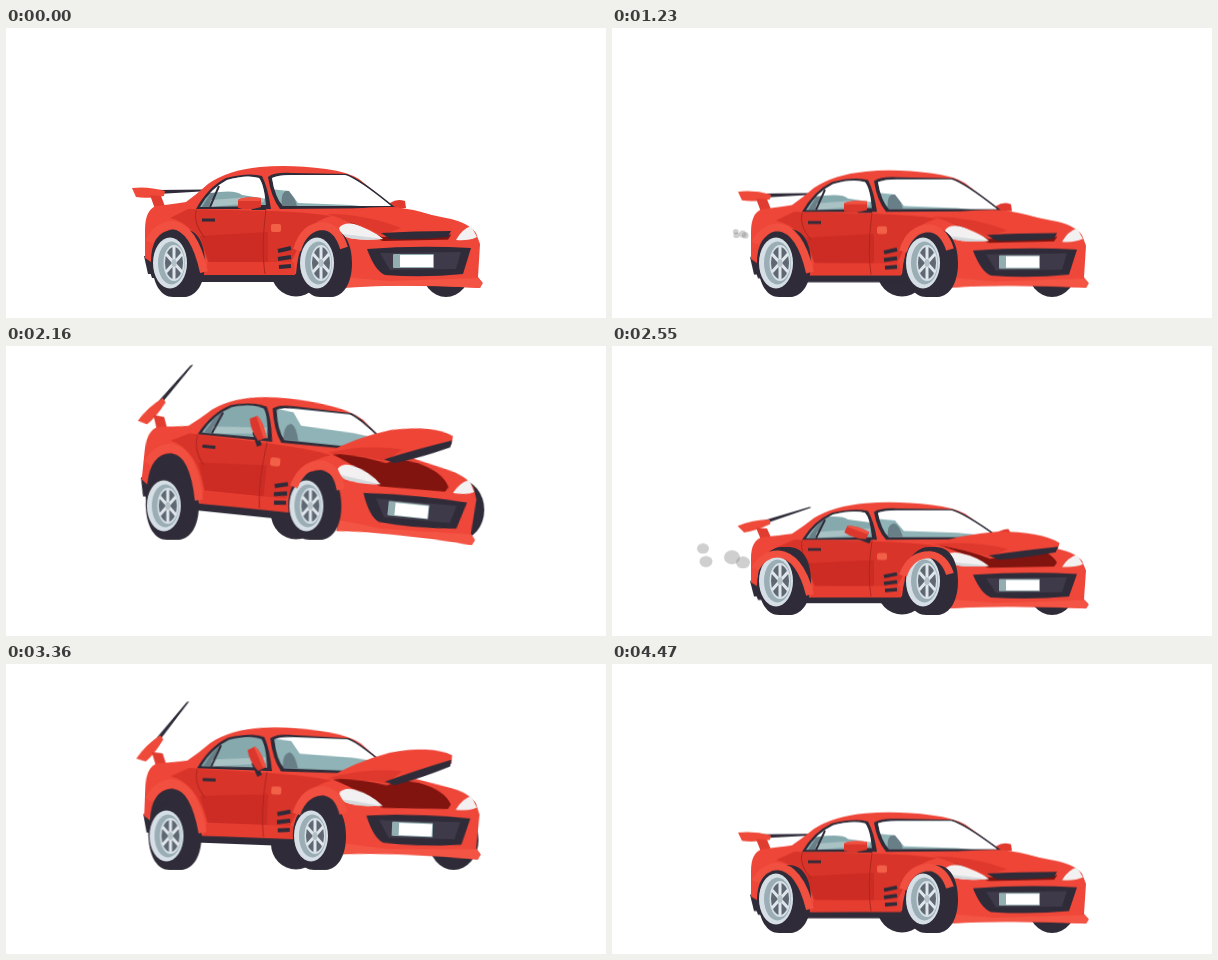
Write an HTML page without scripts that moves like this. It is 600 px wide and 290 px high and loops after 4500 ms.

```html
<!DOCTYPE html>
<html lang="en">
<head>
<meta charset="utf-8">
<title>Bouncing car</title>
<style>
  @property --open { syntax: "<number>"; inherits: true; initial-value: 0; }
  html, body { margin: 0; width: 100%; height: 100%; overflow: hidden; background: #fff; }
  svg { display: block; width: 100%; height: 100%; }

  .hop { animation: hop 1.5s infinite; }
  .spread { animation: spread 1.5s linear infinite; }
  .body { transform-origin: 300px 258px; animation: ride 1.5s linear infinite, flap 1.5s linear infinite; }

  .spoiler { transform-origin: 142px 164px; transform: rotate(calc(var(--open) * -51deg)); }
  .hood { transform-origin: 322px 187px; transform: rotate(calc(var(--open) * -18.5deg)); }
  .mirror { transform-origin: 251px 177px; transform: rotate(calc(var(--open) * 63deg)); }
  .far-mirror { transform-origin: 386px 178px; transform: rotate(calc(var(--open) * -60deg)); }
  .side-glare { transform: translateY(calc(var(--open) * -26px)); }
  .front-glare { transform: translateY(calc(var(--open) * -12px)); }

  .puffs circle { fill: #8c8c8c; opacity: 0; animation: puff 1.125s linear infinite; }

  @keyframes hop {
    0% { transform: translateY(0); animation-timing-function: linear; }
    11.9% { transform: translateY(0); animation-timing-function: cubic-bezier(.333, .667, .667, 1); }
    36.2% { transform: translateY(-84px); animation-timing-function: cubic-bezier(.333, 0, .667, .333); }
    60.5%, 100% { transform: translateY(0); animation-timing-function: linear; }
  }
  @keyframes spread {
    0%, 16% { transform: none; }
    24% { transform: translateX(calc(var(--dx) * .5)); }
    50% { transform: translateX(var(--dx)); }
    56% { transform: translateX(calc(var(--dx) * .55)); }
    62%, 100% { transform: none; }
  }
  @keyframes ride {
    0% { transform: translate(0, 0) rotate(0deg) scaleY(1); }
    4% { transform: translate(0, 0) rotate(0deg) scaleY(1.02); }
    8% { transform: translate(0, -3px) rotate(-1deg) scaleY(.98); }
    12% { transform: translate(0, -12px) rotate(-3deg) scaleY(.96); }
    16% { transform: translate(1px, -32px) rotate(-4deg) scaleY(.97); }
    20% { transform: translate(0, -54px) rotate(-1deg) scaleY(1); }
    24% { transform: translate(-2px, -71px) rotate(2.2deg) scaleY(1.02); }
    30% { transform: translate(-4px, -85px) rotate(3.6deg) scaleY(1.03); }
    36% { transform: translate(-5px, -91px) rotate(4.8deg) scaleY(1.03); }
    43% { transform: translate(-7px, -82px) rotate(5.8deg) scaleY(1.04); }
    50% { transform: translate(-8px, -62px) rotate(6.5deg) scaleY(1.04); }
    56% { transform: translate(-6px, -33px) rotate(5.8deg) scaleY(1.03); }
    60.5% { transform: translate(-3px, -4px) rotate(3.5deg) scaleY(.98); }
    65.5% { transform: translate(0, 8px) rotate(1deg) scaleY(.82); }
    70% { transform: translate(0, 3px) rotate(0deg) scaleY(.87); }
    75.5% { transform: translate(0, 0) rotate(0deg) scaleY(1.04); }
    81% { transform: translate(0, 0) rotate(0deg) scaleY(.95); }
    86% { transform: translate(0, 0) rotate(0deg) scaleY(1.01); }
    90% { transform: translate(0, 0) rotate(0deg) scaleY(1); }
    95% { transform: translate(0, 0) rotate(0deg) scaleY(.92); }
    98% { transform: translate(0, 0) rotate(0deg) scaleY(.91); }
    100% { transform: translate(0, 0) rotate(0deg) scaleY(1); }
  }
  @keyframes flap {
    0%, 60.5% { --open: 0; }
    8% { --open: .03; }
    16% { --open: .45; }
    24% { --open: 1; }
    37% { --open: 1.06; }
    50% { --open: 1; }
    56% { --open: .25; }
    66% { --open: .45; }
    70% { --open: .36; }
    77%, 100% { --open: 0; }
  }
  @keyframes puff {
    0%, 4% { transform: translate(0, 0) scale(.3); opacity: 0; }
    6% { opacity: .42; }
    26.7% { transform: translate(var(--x), var(--y)) scale(1); opacity: .42; }
    41.3% { transform: translate(calc(var(--x) - 8px), calc(var(--y) * .6)) scale(1); opacity: .42; }
    52% { transform: translate(calc(var(--x) - 15px), calc(var(--y) * .6)) scale(.4); opacity: .25; }
    53%, 100% { transform: translate(calc(var(--x) - 15px), 0) scale(0); opacity: 0; }
  }
</style>
</head>
<body>
<svg viewBox="0 0 600 290">
  <defs>
    <g id="wheel">
      <path fill="#2f2b38" d="M5-34C-10-33-19-16-18 2C-17 21-9 34 3 34H15C27 33 35 20 35 0C35-20 27-34 13-34Z"/>
      <ellipse rx="17" ry="25.5" fill="#d5dfe5"/>
      <ellipse cx="1.5" rx="13.5" ry="21.5" fill="#9badb5"/>
      <ellipse cx="4" rx="10.5" ry="18" fill="#d5dfe5"/>
      <ellipse cx="4" rx="9" ry="16" fill="#5f6772"/>
      <path d="M4-16V16M-4-9L12 9M-4 9L12-9" stroke="#dfe7ec" stroke-width="3"/>
      <ellipse cx="4" rx="2.5" ry="4" fill="#b5c1c8"/>
    </g>
    <path id="side-window" d="M194 179Q204 161 221 152Q241 146 253 150Q258 156 260 178Z"/>
    <path id="windscreen" d="M266 150Q272 147 285 147L339 147Q352 151 385 178L277 178Q269 170 266 150Z"/>
    <clipPath id="glass">
      <use href="#side-window"/>
      <use href="#windscreen"/>
    </clipPath>
  </defs>

  <!-- Far wheels -->
  <g class="hop" fill="#2f2b38">
    <ellipse cx="290" cy="243" rx="25" ry="25.5"/>
    <ellipse class="spread" style="--dx: 15px" cx="440" cy="239" rx="25" ry="30"/>
  </g>

  <g class="body">
    <g class="puffs" transform="translate(134 205)">
      <circle r="6" style="--x: -43px; --y: -14px"/>
      <circle r="6.5" style="--x: -40px; --y: 1px"/>
      <circle r="8" style="--x: -14px; --y: -4px"/>
      <circle r="7" style="--x: -3px; --y: 2px"/>
    </g>
    <g fill="#2f2b38">
      <path d="M140 232Q140 202 166 200Q194 202 196 246L190 250H146Z"/>
      <path d="M288 244Q289 204 318 200Q342 206 343 250H290Z"/>
      <path d="M190 244H296V254H190Z"/>
      <path d="M138 228H152V246H142Z"/>
    </g>
    <g class="spoiler">
      <path fill="#2f2b38" d="M150 162L201 161.5L203 163L152 166Z"/>
      <path fill="#ef4a39" d="M126 160Q142 158 159 163L158 168Q140 171 130 169Z"/>
    </g>
    <path fill="#e03c30" d="M144 167L155 168L160 181L149 181Z"/>
    <g class="far-mirror">
      <path fill="#e03a2e" d="M384 175Q391 170 399 173L400 180L386 181Z"/>
    </g>

    <!-- Shell with open wheel arches -->
    <path fill="#ee4638" d="M139 230V202Q139 182 150 178Q168 176 180 174Q191 166 202 156Q222 142 254 139
      Q284 136 320 141Q342 144 353 151L388 179L440 190Q462 194 470 205L474 216L472 249L476 254
      L474 260Q400 256 338 259V236Q337 206 317 203Q293 204 290 246L197 247
      Q193 205 166 202Q145 204 145 234Z"/>
    <path fill="#d9342a" d="M182 181L264 183Q300 184 325 188Q296 196 290 224L284 236L202 234Q191 196 164 190Z"/>
    <path fill="#cc2c24" d="M194 208L262 204V235L203 234Z"/>
    <path fill="#e63d31" d="M202 234H288L289 247H199Z"/>
    <path fill="none" stroke="#ae2620" d="M260 182Q255 220 259 246M190 182Q187 196 199 210"/>
    <path fill="none" stroke="#2f2b38" stroke-width="3" d="M196 192H209"/>
    <rect x="265" y="196" width="10" height="8" rx="2" fill="#f26048"/>
    <path stroke="#2f2b38" stroke-width="4" d="M272 223L285 220M272 231L285 229M273 239L285 238"/>

    <!-- Glass -->
    <path fill="#2f2b38" d="M190 181Q202 159 220 150Q243 144 256 148Q262 160 265 181ZM262 149Q268 144 286 145L341 146Q355 151 390 180L274 181Q265 169 262 149Z"/>
    <use href="#side-window" fill="#86a9ae"/>
    <use href="#windscreen" fill="#8fb3b6"/>
    <g clip-path="url(#glass)">
      <path fill="#697f88" d="M276 178Q274 164 282 162Q287 163 291 178ZM196 179L211 155H215L203 179Z"/>
      <path fill="#a9c2c4" d="M205 172L258 168V174L203 179Z"/>
      <path class="side-glare" fill="#fff" d="M204 165Q230 161 236 167L262 171V120H204Z"/>
      <path class="front-glare" fill="#fff" d="M264 161L283 163L292 175L345 177L400 183V120H264Z"/>
    </g>
    <path stroke="#2f2b38" stroke-width="2" d="M204 179L213 158"/>
    <g class="mirror">
      <path fill="#2f2b38" d="M243 177H260V182H246Z"/>
      <path fill="#dc372c" d="M232 172Q238 168 255 170V179Q243 183 232 180Z"/>
      <path fill="#f05242" d="M232 172Q238 168 255 170L254 173H232Z"/>
    </g>

    <!-- Engine bay and front -->
    <path fill="#82140f" d="M326 187Q365 181 412 187Q438 193 445 207L440 215H378Q360 199 326 187Z"/>
    <path fill="#ef4739" d="M334 207L378 213L470 211L473 223L470 251L341 252Z"/>
    <path fill="#f35443" d="M338 249L383 253L472 250L477 255L474 260Q400 255 338 260Z"/>
    <path fill="#f2f0f0" d="M333 200Q337 194 348 196Q365 200 377 211Q352 213 340 209Q334 206 333 200Z"/>
    <path fill="#d4d9dc" d="M336 206Q354 208 377 211Q352 213 340 209Z"/>
    <path fill="#f2f0f0" d="M450 212Q456 201 465 198L471 209Q463 213 450 212Z"/>
    <path fill="#2f2b38" d="M361 221Q412 217 465 220L457 246Q418 250 379 247Q369 243 361 221Z"/>
    <path fill="#3f3a49" d="M374 225L455 224L450 241L384 242Z"/>
    <rect x="387" y="226" width="41" height="14" rx="1" fill="#93aeb0"/>
    <rect x="394" y="227" width="33" height="12" fill="#fff"/>

    <g class="hood">
      <path fill="#ee4537" d="M321 186Q350 178 388 179Q430 184 447 199L444 207L376 209Q352 195 321 186Z"/>
      <path fill="#df392e" d="M321 186Q360 186 395 200L376 207Q352 195 321 186Z"/>
      <path fill="#2f2b38" d="M375 205Q408 203 445 203L442 209Q410 212 384 211Z"/>
    </g>
  </g>

  <!-- Near wheels -->
  <g class="hop">
    <g class="spread" style="--dx: -7px"><use href="#wheel" x="164" y="235"/></g>
    <g class="spread" style="--dx: -12px"><use href="#wheel" x="311" y="235"/></g>
  </g>

  <!-- Arch flares overlap the tyres -->
  <g class="body">
    <path fill="none" stroke="#f15040" stroke-width="8" d="M143 214Q152 197 166 197Q188 199 198 244M291 222Q298 198 318 198Q332 200 338 220"/>
  </g>
</svg>
</body>
</html>
```
